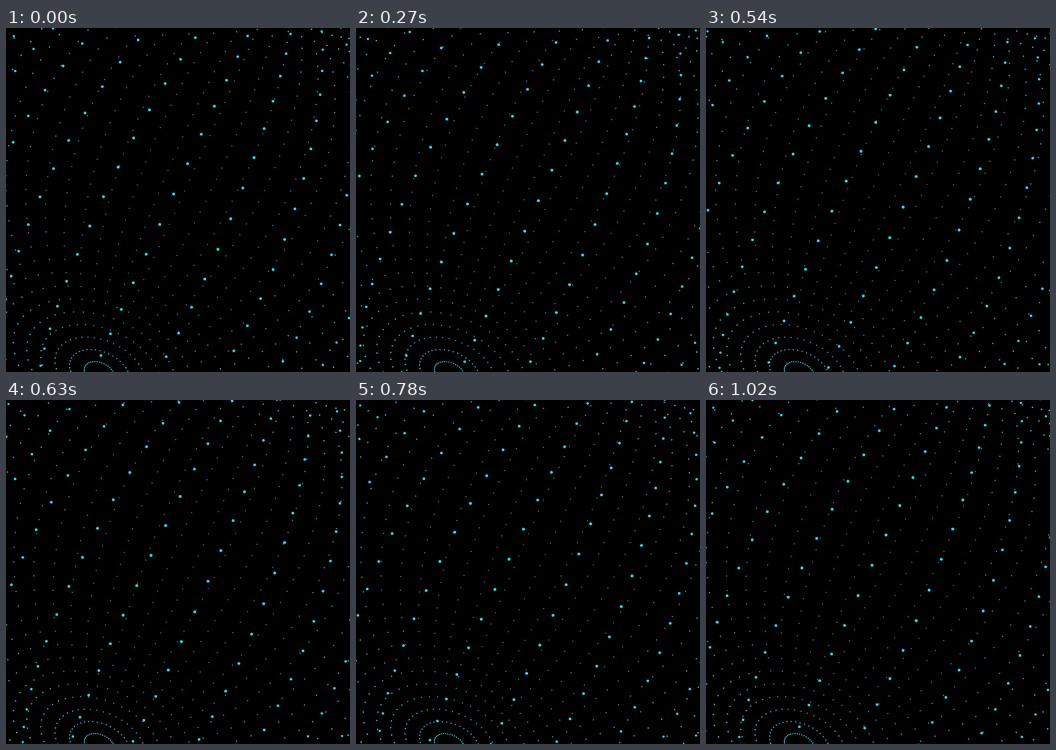
Recreate the animation shown at these times as an HTML page. Size 720x720 px, loop 1050 ms.

```html
<!DOCTYPE html>
<html lang="en">
<head>
<meta charset="utf-8">
<title>Dotted globe</title>
<style>
  html, body { margin: 0; width: 100%; height: 100%; overflow: hidden; background: #000; }
  svg { display: block; width: 100%; height: 100%; }
</style>
</head>
<body>
<svg id="globe" viewBox="0 0 720 720"></svg>
<script>
const LOOP = 1050, STEPS = 35;
const MERIDIANS = 40, BANDS = 39;
const FOCAL = 1000, DISTANCE = 2.148;   // in pixels, in globe radii
const NEAR_RADIUS = 2.95, FALLOFF = 1.15;
const NEAR_COLOUR = '#0ff', FAR_COLOUR = '#28e6ff';
const rad = degrees => degrees * Math.PI / 180;
const POLE = rad(74.35);                // angle from the near pole to the viewer
const ROLL = rad(24.4);
const PHASE = rad(-0.918);
const STEP = 2 * Math.PI / MERIDIANS;

const [sinPole, cosPole] = [Math.sin(POLE), Math.cos(POLE)];
const [sinRoll, cosRoll] = [Math.sin(ROLL), Math.cos(ROLL)];
const globe = document.getElementById('globe');
const dots = [];

for (let band = 1; band < BANDS; band++) {
  for (let m = 0; m < MERIDIANS; m++) {
    const node = document.createElementNS('http://www.w3.org/2000/svg', 'circle');
    globe.append(node);
    dots.push({ node, polar: band * Math.PI / BANDS, lon: PHASE + m * STEP });
  }
}

function project(polar, lon) {
  const height = Math.cos(polar), ring = Math.sin(polar), reach = ring * Math.cos(lon);
  const towards = height * cosPole + reach * sinPole;
  const depth = DISTANCE - towards;
  const across = FOCAL * ring * Math.sin(lon) / depth;
  const down = FOCAL * (reach * cosPole - height * sinPole) / depth;
  return {
    x: 360 + across * cosRoll - down * sinRoll,
    y: 360 + across * sinRoll + down * cosRoll,
    r: NEAR_RADIUS * ((DISTANCE - 1) / depth) ** FALLOFF,
    near: towards > 1 / DISTANCE
  };
}

function render(time) {
  const turn = Math.floor(time % LOOP / LOOP * STEPS) / STEPS * STEP;
  for (const { node, polar, lon } of dots) {
    const { x, y, r, near } = project(polar, lon + turn);
    node.setAttribute('cx', x.toFixed(2));
    node.setAttribute('cy', y.toFixed(2));
    node.setAttribute('r', r.toFixed(2));
    node.setAttribute('fill', near ? NEAR_COLOUR : FAR_COLOUR);
  }
}

const start = performance.now();
function tick() {
  render(performance.now() - start);
  requestAnimationFrame(tick);
}
tick();
</script>
</body>
</html>
```
